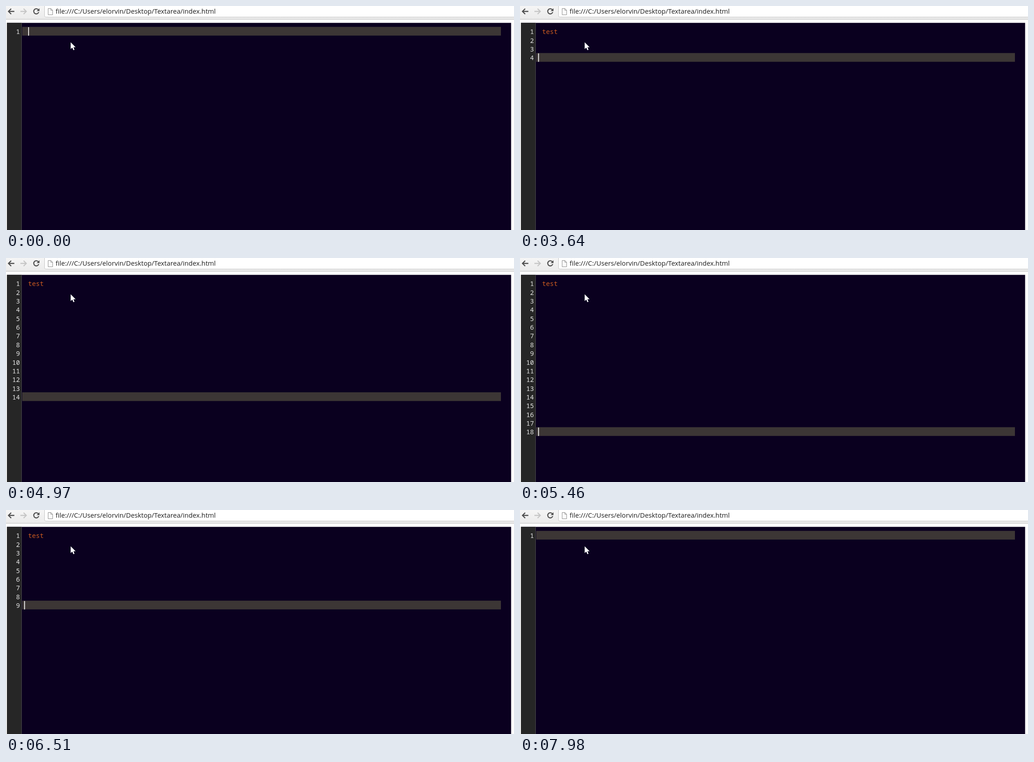
Write an HTML page with a canvas that moves like this. It is 1127 px wide and 497 px high and loops after 8000 ms.

```html
<!DOCTYPE html>
<html lang="en">
<head>
<meta charset="utf-8">
<title>Editor</title>
<style>
  html, body { margin: 0; width: 100%; height: 100%; overflow: hidden; background: #fff; }
  canvas { display: block; }
</style>
</head>
<body>
<canvas id="stage" width="1127" height="497"></canvas>
<script>
const ctx = document.getElementById('stage').getContext('2d');
const LOOP = 8000, STEP = 70, PITCH = 19.36, BLINK = 465, REPEAT = 105;
const MONO = '500 14.4px "Noto Sans Mono", monospace';
const SANS = '14.72px "Open Sans", sans-serif';

// Number of key presses so far, for a key repeating at a fixed interval.
function presses(t, start, interval, count) {
  return Math.max(0, Math.min(count, Math.floor((t - start) / interval) + 1));
}

function lineCount(t) {
  const added = presses(t, 3360, 140, 7) + presses(t, 4410, REPEAT, 10);
  const removed = presses(t, 5600, REPEAT, 8) + presses(t, 6510, REPEAT, 9);
  return 1 + added - removed;
}

function letterCount(t) {
  return presses(t, 2660, 90, 4) - presses(t, 7630, 95, 4);
}

// The caret blinks evenly, but stays lit during the first held Backspace.
function caretVisible(t) {
  const deleting = t >= 5460 && t < 6370;
  return deleting || Math.floor((t - 255) / BLINK) % 2 !== 0;
}

function rect(x, y, w, h, color) {
  ctx.fillStyle = color;
  ctx.fillRect(x, y, w, h);
}

function text(str, x, y, color, font, align = 'left') {
  ctx.font = font;
  ctx.fillStyle = color;
  ctx.textAlign = align;
  ctx.fillText(str, x, y);
}

function path(d, stroke, width, fill) {
  const p = new Path2D(d);
  if (fill) { ctx.fillStyle = fill; ctx.fill(p); }
  if (stroke) { ctx.strokeStyle = stroke; ctx.lineWidth = width; ctx.stroke(p); }
}

function drawToolbar() {
  const shade = ctx.createLinearGradient(0, 0, 0, 29);
  shade.addColorStop(0, '#f5f5f5');
  shade.addColorStop(1, '#ebebeb');
  rect(0, 0, 1127, 29, shade);
  rect(0, 29, 1127, 1, '#bcbcbc');
  path('M85.5 -2V21.5Q85.5 24.5 88.5 24.5H1130V-2Z', '#c3c3c3', 1, '#fff');
  path('M18.5 12H6M11.5 6L5.5 12L11.5 18', '#4f4f4f', 2.4);
  path('M32 12H44.5M39 6L45 12L39 18', '#c6c6c6', 2.4);
  path('M72 8.6A5.7 5.7 0 1 0 72.7 13.5', '#4f4f4f', 2.3);
  path('M74.3 5V11.3H68Z', null, 0, '#4f4f4f');
  path('M93.5 5.5H99.5L103.5 9.5V19.5H93.5ZM99.5 5.5V9.5H103.5', '#8a8a8a', 1, '#fdfdfd');
  text('file:///C:/Users/elorvin/Desktop/Textarea/index.html', 110, 17, '#1e1e1e', SANS);
}

function drawEditor(t) {
  const line = lineCount(t), letters = letterCount(t);
  const top = n => 46.3 + (n - 1) * PITCH;

  rect(2, 37.4, 1118.6, 460, '#0a001f');
  rect(2, 37.4, 32, 460, '#262626');
  rect(34, 37.4, 1, 460, '#4c4a4c');
  rect(36, top(line), 1062, PITCH, '#3c3635');
  for (let n = 1; n <= line; n++) {
    text(n, 31, Math.round(top(n)) + 16, '#e6e6e6', MONO, 'right');
  }
  text('test'.slice(0, letters), 49, 62, '#cb5a20', MONO);

  if (caretVisible(t)) {
    const x = line > 1 ? 40.4 : 49.3 + letters * 8.64;
    rect(x, top(line) + 0.7, 1.7, 18.8, '#fff');
  }
  path('M143.5 80.5V95.5L147 92.3L149.5 98L152 97L149.6 91.4H154.4Z', null, 0, '#fff');
}

function draw(now) {
  const t = now % LOOP;
  rect(0, 0, 1127, 497, '#fff');
  drawToolbar();
  drawEditor(t - t % STEP);
  requestAnimationFrame(draw);
}
requestAnimationFrame(draw);
</script>
</body>
</html>
```
